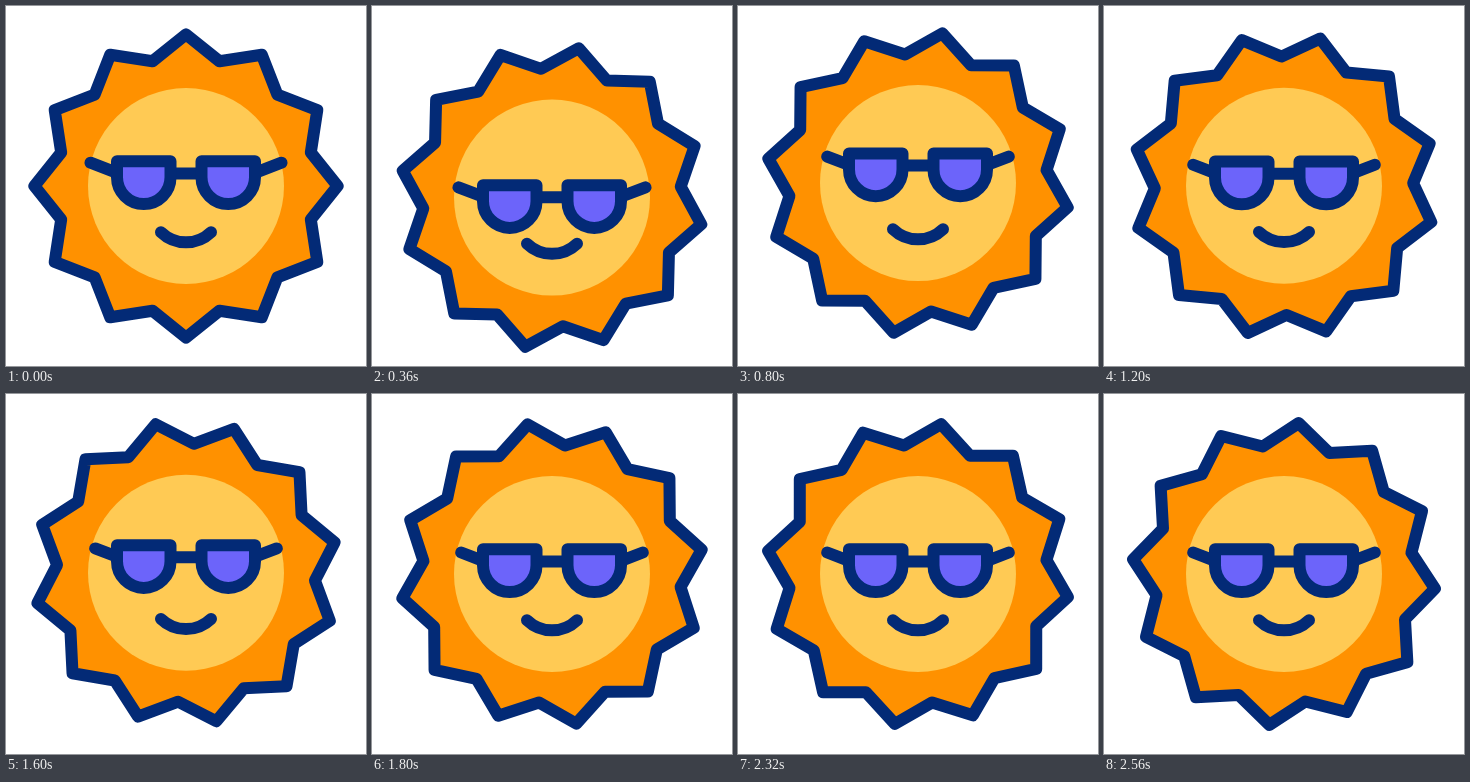
An HTML page that plays this animation: 360x360 px, repeating every 2600 ms.

```html
<!DOCTYPE html>
<html lang="en">
<head>
<meta charset="utf-8">
<title>Sun with sunglasses</title>
<style>
  html, body { margin: 0; width: 100%; height: 100%; overflow: hidden; background: #fff; }
  svg { display: block; width: 100vw; height: 100vh; }
  .line { fill: none; stroke: #032a76; stroke-width: 12; stroke-linecap: round; stroke-linejoin: round; }
</style>
</head>
<body>
<svg viewBox="0 0 360 360">
  <g id="body">
    <polygon id="rays" class="line" style="fill:#ff9100"/>
    <circle cx="180" cy="180" r="98" fill="#ffca54"/>
    <path class="line" d="M155 226.2A36 36 0 0 0 205 226.2"/>
  </g>
  <g id="glasses" class="line">
    <path id="arms"/>
    <path d="M164 167.4H196"/>
    <path style="fill:#6c64fa" d="M111 155.3H164.5V171.3a26.75 26.75 0 0 1-53.5 0Z"/>
    <path style="fill:#6c64fa" d="M195.5 155.3H249V171.3a26.75 26.75 0 0 1-53.5 0Z"/>
  </g>
</svg>
<script>
const LOOP = 2600, STEP = 40;
const LAG = 20; // the glasses trail the body
const $ = id => document.getElementById(id);
const [body, rays, glasses, arms] = ['body', 'rays', 'glasses', 'arms'].map($);

// time, body offset, glasses offset
const bounce = [
  [0, 0, 0], [330, 12, 24], [650, -9, -17], [1000, 6.5, 13],
  [1360, -5, -12.5], [1720, 0, 0], [LOOP, 0, 0]
];

const ease = p => (1 - Math.cos(Math.PI * p)) / 2;

function offset(t, col) {
  const i = bounce.findIndex(k => k[0] > t);
  const a = bounce[i - 1], b = bounce[i];
  return a[col] + (b[col] - a[col]) * ease((t - a[0]) / (b[0] - a[0]));
}

rays.setAttribute('points', Array.from({ length: 24 }, (_, i) => {
  const r = i % 2 ? 129.2 : 151.6, a = i * Math.PI / 12;
  return [180 + r * Math.sin(a), 180 - r * Math.cos(a)].map(v => v.toFixed(2));
}).join(' '));

function draw(t) {
  const reach = 95.5 - 4.7 * ease(Math.min(t / 800, 1));
  const y = 166.8 - 0.38 * (reach - 69);
  body.setAttribute('transform', `translate(0 ${offset(t, 1)})`);
  rays.setAttribute('transform', `rotate(${-360 * t / LOOP} 180 180)`);
  glasses.setAttribute('transform', `translate(0 ${offset(Math.max(t - LAG, 0), 2)})`);
  arms.setAttribute('d', `M${180 - reach} ${y}L111 166.8M${180 + reach} ${y}L249 166.8`);
}

const start = performance.now();
function tick() {
  const t = (performance.now() - start) % LOOP;
  draw(Math.floor(t / STEP) * STEP);
  requestAnimationFrame(tick);
}
tick();
</script>
</body>
</html>
```
